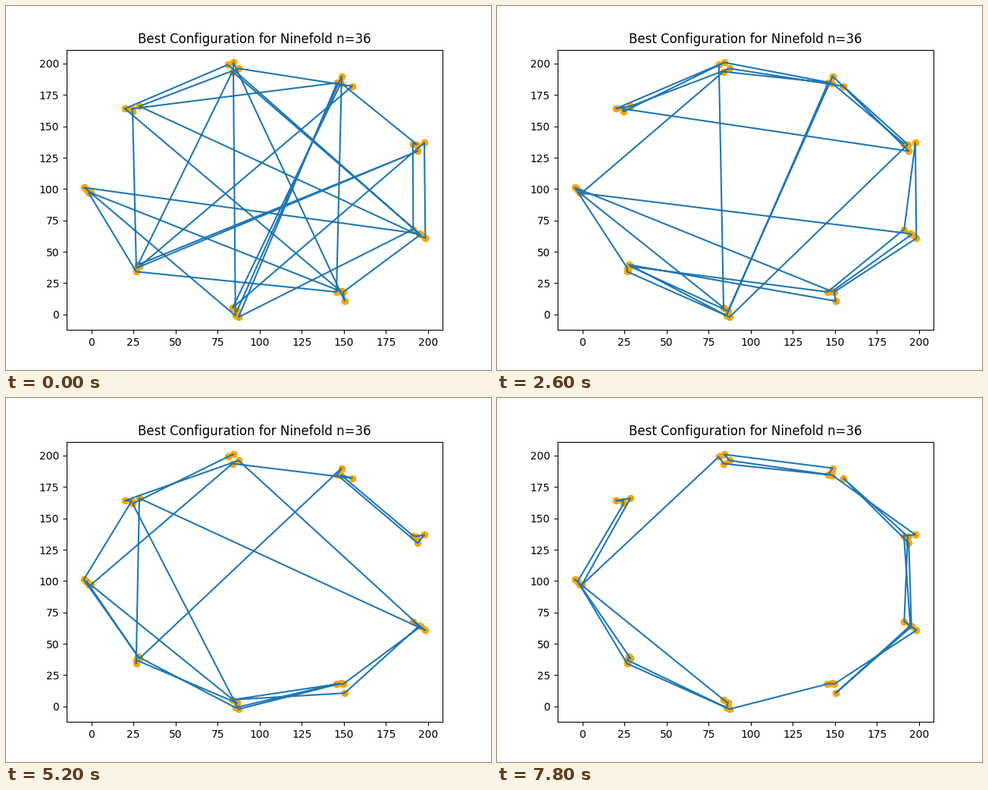
Animation of 640x480 px, one loop 8 s. Source, as a matplotlib script:

```python
import matplotlib.pyplot as plt
from matplotlib.animation import FuncAnimation

FRAMES, STEP = 40, 200

# Nine groups of four stops around a ring
GROUPS = {
    "A": [(191.0, 136.2), (193.3, 135.6), (197.8, 136.9), (193.9, 130.2)],
    "B": [(146.0, 184.7), (148.3, 184.5), (148.7, 190.0), (155.0, 182.0)],
    "C": [(81.1, 199.1), (84.3, 200.9), (83.8, 193.6), (87.5, 196.1)],
    "D": [(19.9, 164.1), (24.0, 164.0), (28.5, 166.0), (24.5, 161.7)],
    "E": [(-4.5, 101.2), (-2.8, 99.7), (-1.6, 97.0), (-0.3, 97.0)],
    "F": [(26.6, 34.2), (26.7, 37.0), (27.7, 39.7), (28.6, 38.3)],
    "G": [(83.9, 5.4), (86.5, 2.8), (85.6, -0.9), (87.4, -2.1)],
    "H": [(145.6, 18.0), (148.3, 18.4), (149.6, 17.9), (150.5, 10.7)],
    "I": [(191.2, 67.9), (194.8, 64.4), (195.5, 63.7), (198.4, 60.8)],
}
STOPS = {f"{g}{i}": p for g, pts in GROUPS.items() for i, p in enumerate(pts)}

# Best route found at certain generations, as the order of visited stops
ROUTES = {
    0: "F3 B3 C3 D2 I3 A2 G0 B1 A1 A0 I0 G3 B0 D1 D3 F1 A3 F2 "
       "C2 I2 H2 H3 C1 G2 E1 E0 I1 C0 D0 H1 E3 E2 F0 H0 B2 G1",
    6: "I0 D2 B3 G2 G3 I3 C2 C3 G0 F3 I1 C0 D1 F0 E2 H1 D3 E3 "
       "B0 C1 I2 H2 H3 G1 B2 A1 A2 A0 E0 E1 F1 D0 B1 A3 H0 F2",
    13: "A0 B1 C1 D3 D1 A3 B2 G1 F3 H0 I0 A2 I3 H2 H3 F2 G3 A1 "
        "B3 C3 D2 D0 C0 G0 E2 I1 I2 H1 E0 F1 F0 G2 B0 C2 E3 E1",
    19: "I3 A2 C0 B2 F3 G0 E0 F2 F1 D0 D2 D1 D3 G1 H0 I0 A0 A3 "
        "A1 F0 E1 E2 H1 H2 I2 H3 I1 B1 B0 E3 G3 G2 B3 C2 C3 C1",
    26: "C1 C0 D3 G3 H1 G0 H3 I1 C3 D0 D1 E0 F3 B2 B0 A3 A2 A1 "
        "A0 B1 B3 C2 E3 G1 F1 F0 D2 I3 I0 I2 H2 H0 G2 F2 E1 E2",
    31: "D0 C1 C0 C2 B3 A0 A3 F1 F0 F3 G1 G3 H0 B0 C3 B1 B2 A2 "
        "A1 H2 I1 F2 E2 E0 D1 D2 D3 G0 H1 H3 I0 I3 I2 G2 E3 E1",
    39: "E2 F0 G3 H0 H1 H2 I3 I0 A1 B3 A3 I2 H3 I1 A0 A2 B1 C3 "
        "C1 B2 B0 C2 C0 E3 D2 D0 D1 D3 E1 F3 F2 F1 G2 G1 G0 E0",
}


def route_at(gen):
    """Order crossover: head of the next route, the rest in the previous order."""
    prev = max(k for k in ROUTES if k <= gen)
    old = ROUTES[prev].split()
    if gen == prev:
        return old
    nxt = min(k for k in ROUTES if k > gen)
    new = ROUTES[nxt].split()
    head = new[:round(len(new) * (gen - prev) / (nxt - prev))]
    return head + [s for s in old if s not in head]


fig, ax = plt.subplots(figsize=(6.4, 4.8), dpi=100)
ax.set_title("Best Configuration for Ninefold n=36")
ax.scatter(*zip(*STOPS.values()), color="orange")
line, = ax.plot([], [], color="tab:blue")
ax.set_xlim(-14.7, 208.6)
ax.set_ylim(-12.3, 211.1)
ax.set_xticks(range(0, 201, 25))
ax.set_yticks(range(0, 201, 25))


def draw(gen):
    line.set_data(*zip(*(STOPS[s] for s in route_at(gen))))
    return line,


anim = FuncAnimation(fig, draw, frames=FRAMES, interval=STEP,
                     repeat=True, repeat_delay=0)
plt.show()
```
